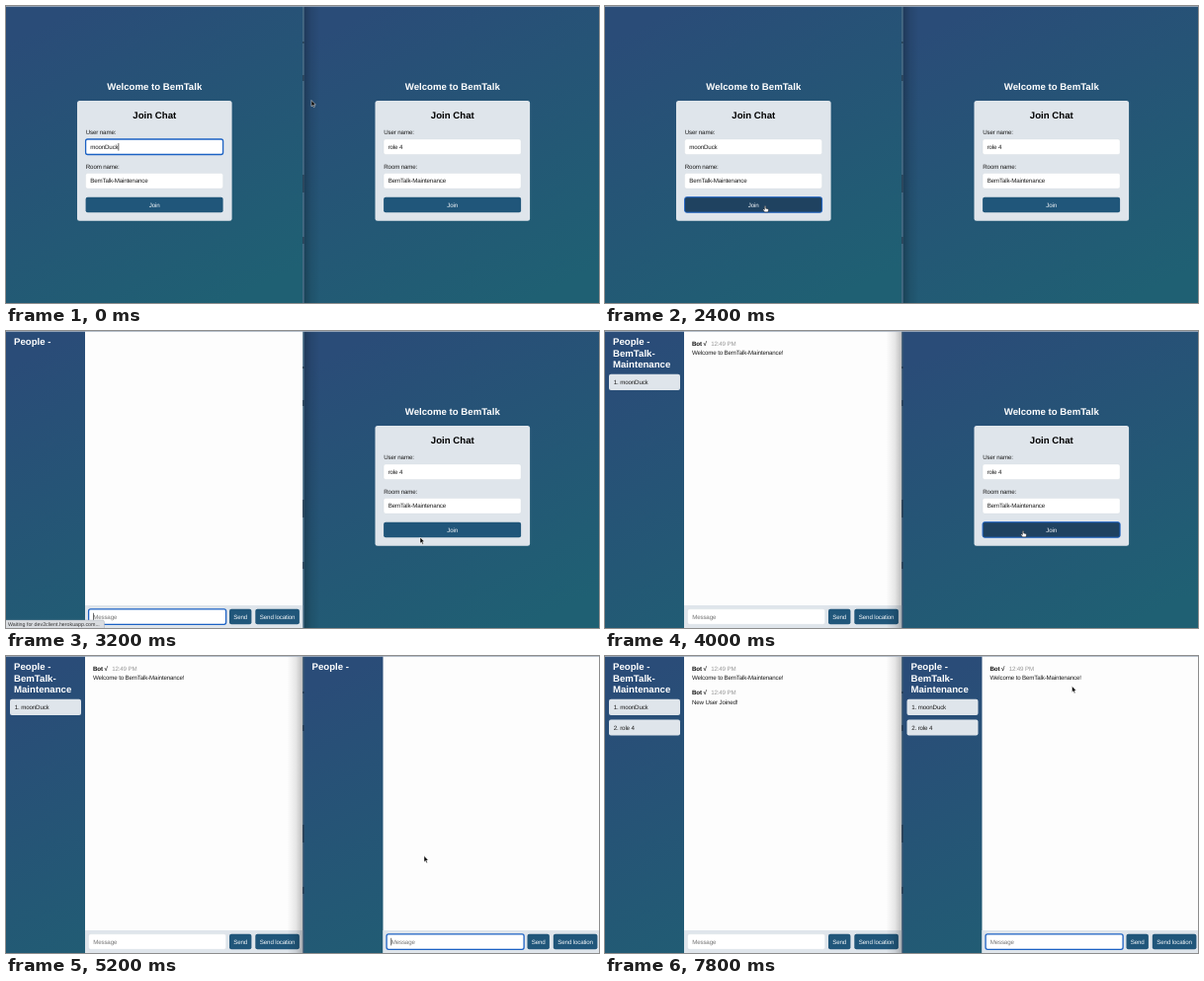
Write an HTML page that moves like this. It is 600 px wide and 301 px high and loops after 8 s.

```html
<!DOCTYPE html>
<html lang="en">
<head>
<meta charset="utf-8">
<title>Two chat windows</title>
<style>
  html, body { margin: 0; width: 100%; height: 100%; overflow: hidden; background: #26527a; }
  svg { display: block; width: 100%; height: 100%; }
  text {
    font: 6.2px "Liberation Sans", Arial, sans-serif;
    letter-spacing: -.025em;
    text-rendering: geometricPrecision;
    fill: #1c1c1c;
  }
  .h { font-weight: bold; font-size: 9.65px; letter-spacing: 0; fill: #fff; }
  .dark { fill: #000; }
  .b { font-weight: bold; fill: #111; }
  .light { fill: #f4f7fa; }
  .grey { fill: #777; }
  .time { fill: #999; }
  .mid { text-anchor: middle; }
  .status { font-size: 5.3px; letter-spacing: 0; fill: #333; }
</style>
</head>
<body>
<svg viewBox="0 0 600 301" preserveAspectRatio="none">
  <defs>
    <linearGradient id="page" gradientUnits="userSpaceOnUse" x1="75" y1="0" x2="225" y2="301">
      <stop offset="0" stop-color="#2a4c78"/><stop offset="1" stop-color="#1f6073"/>
    </linearGradient>
    <linearGradient id="shade">
      <stop offset="0" stop-color="#000" stop-opacity=".26"/>
      <stop offset=".45" stop-color="#000" stop-opacity=".09"/>
      <stop offset="1" stop-color="#000" stop-opacity="0"/>
    </linearGradient>
  </defs>
  <g id="scene"></g>
</svg>
<script>
const LOOP = 8000, STEP = 200, RIGHT = 301.5;
const APP = "BemTalk", TEAM = "Maintenance", ROOM = `${APP}-${TEAM}`;
const USERS = ["moonDuck", "role 4"];
const PANEL = "#dfe5eb", BUTTON = "#20567a", HOVER = "#1f4260", RING = "#1c62c4";

// Times in ms at which each window changes.
const LEFT_TIMES = { wait: 2600, chat: 2800, data: 4000 };
const RIGHT_TIMES = { wait: 4400, chat: 5200, data: 5800 };
const USER_TWO_JOINS = 5800;

// Pointer path: time, x, y of the tip.
const PATH = [
  [0, 309, 95.5], [200, 340, 108], [400, 378, 130], [600, 394, 141], [800, 380, 137],
  [1000, 335, 115], [1200, 289.5, 97], [1600, 215, 150], [2000, 163, 202],
  [2600, 161.5, 203], [2800, 230, 208], [3200, 419, 209], [3400, 423, 202.5],
  [5800, 423, 202.5], [6200, 423.5, 201.5], [6800, 430, 165], [7400, 462, 65],
  [7800, 472.5, 30.5]
];

const rect = (x, y, w, h, fill, r = 0, extra = "") =>
  `<rect x="${x}" y="${y}" width="${w}" height="${h}" rx="${r}" fill="${fill}" ${extra}/>`;
const text = (x, y, s, cls = "") => `<text x="${x}" y="${y}" class="${cls}">${s}</text>`;
const at = (x, y, body) => `<g transform="translate(${x} ${y})">${body}</g>`;

function field(x, y, value, cls, focus, caretX) {
  const ring = focus ? `stroke="${RING}" stroke-width="1.3"` : `stroke="#cfd6dd" stroke-width=".3"`;
  return rect(x, y, 139, 15.5, "#fff", 2, ring) + text(x + 4.6, y + 9.9, value, cls) +
    (focus && focus.caret ? rect(caretX, y + 4, .6, 7.6, "#111") : "");
}

function button(x, y, w, label, hover, focus) {
  return rect(x, y, w, 15.5, hover ? HOVER : BUTTON, 2, focus ? `stroke="${RING}"` : "") +
    text(x + w / 2, y + 10, label, "mid light");
}

function joinPage(user, focus, hover, pressed) {
  return text(150.3, 84.8, `Welcome to ${APP}`, "h mid") +
    rect(72, 96, 156.6, 121.7, PANEL, 2.5) +
    text(150.3, 113.8, "Join Chat", "h mid dark") +
    text(80.8, 130.2, "User name:") +
    field(80.6, 135, user, "", focus, user === USERS[0] ? 113.6 : 100) +
    text(80.8, 164.9, "Room name:") +
    field(80.6, 169.5, ROOM) +
    button(80.6, 193.7, 139, "Join", hover, pressed);
}

const message = (y, s) =>
  text(88, y, "Bot √", "b") + text(107.2, y, "12:49 PM", "time") + text(88, y + 9.2, s);

function chatPage(ready, joined, people, focus) {
  let out = rect(80, 0, 220.5, 301, "#fdfdfd") + rect(80, 278, 220.5, 23, PANEL) +
    field(83.6, 281.8, "Message", "grey", focus, 88) +
    button(226, 281.8, 22.4, "Send") + button(252.3, 281.8, 44.6, "Send location") +
    text(8, 13.9, "People -", "h");
  if (!ready) return out;
  out += text(8, 25.5, `${APP}-`, "h") + text(8, 37.1, TEAM, "h") +
    message(14.9, `Welcome to ${ROOM}!`);
  if (joined) out += message(39.3, "New User Joined!");
  USERS.slice(0, people).forEach((name, i) => {
    out += rect(4, 43.8 + 20.6 * i, 72, 16.2, PANEL, 2) +
      text(8.8, 54.2 + 20.6 * i, `${i + 1}. ${name}`);
  });
  return out;
}

const statusBar = () => rect(-3, 293, 102.5, 11, "#d9dce0", 2, `stroke="#9aa3ac" stroke-width=".4"`) +
  text(2, 299, "Waiting for dev2client.herokuapp.com...", "status");

function pointerAt(t) {
  const i = PATH.findIndex(p => p[0] > t);
  if (i < 0) return PATH[PATH.length - 1].slice(1);
  const [t0, x0, y0] = PATH[i - 1], [t1, x1, y1] = PATH[i], k = (t - t0) / (t1 - t0);
  return [x0 + (x1 - x0) * k, y0 + (y1 - y0) * k];
}

const ARROW = `<path d="M0 0V6.2L1.4 5 2.4 7.2 3.4 6.7 2.5 4.6H4.3Z" fill="#000" stroke="#fff" stroke-width=".5"/>`;
const HAND = `<path d="M-.6.4Q0-.5.7.4V2.5L2.9 3Q3.6 3.2 3.4 4.2L2.9 6.2H-.4L-2.2 3.8Q-2.2 2.9-1.2 3.4L-.6 3.9Z" fill="#fff" stroke="#222" stroke-width=".5"/>`;

function draw(t) {
  const between = (a, b) => t >= a && t < b;
  const focus = (a, b) => between(a, b) && { caret: (t - a) % 1000 < 500 };
  const leftActive = t < 600 || between(2200, 3600);
  const L = LEFT_TIMES, R = RIGHT_TIMES;
  const hoverLeft = between(2200, L.chat), hoverRight = between(3400, R.chat);

  const left = t < L.chat
    ? joinPage(USERS[0], focus(0, 600), hoverLeft, between(2400, L.chat))
    : chatPage(t >= L.data, t >= USER_TWO_JOINS, t >= USER_TWO_JOINS ? 2 : 1, focus(L.chat, 3600));
  const right = t < R.chat
    ? joinPage(USERS[1], focus(600, 2200), hoverRight, between(3600, R.chat))
    : chatPage(t >= R.data, false, 2, focus(R.chat, LOOP));

  const page = rect(0, 0, 300.5, 301, "url(#page)");
  const shade = rect(0, 0, 16, 301, "url(#shade)");
  let out = at(0, 0, page + left + (between(L.wait, L.data) ? statusBar() : ""));
  out += at(RIGHT, 0, page + right);
  out += leftActive ? at(RIGHT, 0, shade) : `<g transform="translate(300.5 0) scale(-1 1)">${shade}</g>`;

  // Gap between the windows, then the thin light edge along the top.
  out += rect(300.3, 0, 1.2, 301, leftActive ? "#557489" : "#3c5770");
  for (const [y, h] of [[36, 2], [70, 6], [171, 18], [234, 7]]) out += rect(300.3, y, 1.2, h, "#20364a");
  if (between(R.wait, R.chat)) out += rect(RIGHT, 293, 99, 8, "#d9dce0", 1.5) +
    text(RIGHT + 2, 299, "Waiting for dev2client.herokuapp.com...", "status");
  out += rect(0, 0, 600, .8, "#a9b5c3");

  return out + at(...pointerAt(t), hoverLeft || hoverRight ? HAND : ARROW);
}

const scene = document.getElementById("scene");
const start = performance.now();
let shown = -1;
function tick() {
  const t = Math.floor((performance.now() - start) % LOOP / STEP) * STEP;
  if (t !== shown) scene.innerHTML = draw(shown = t);
  requestAnimationFrame(tick);
}
tick();
</script>
</body>
</html>
```
